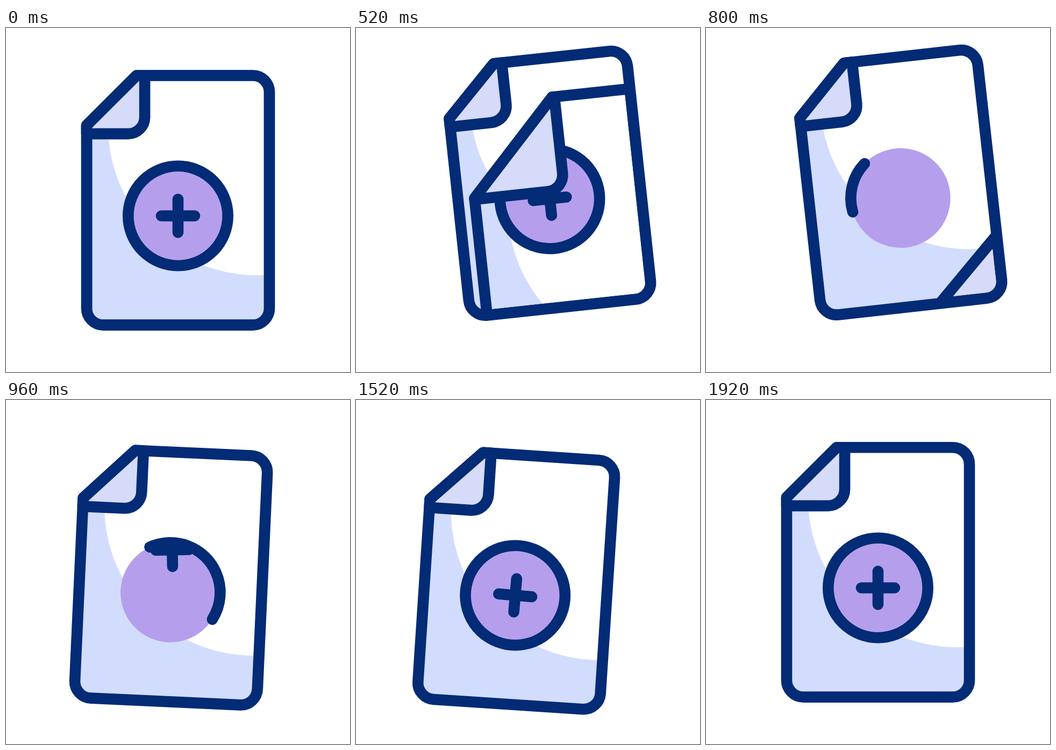
An HTML page with a canvas for the animation above (2000 ms loop, 640 by 640 pixels).

```html
<!DOCTYPE html>
<html lang="en">
<head>
<meta charset="utf-8">
<title>Add page</title>
<style>
  html, body { margin: 0; width: 100%; height: 100%; overflow: hidden; background: #fff; }
  canvas { display: block; width: 100vmin; height: 100vmin; }
</style>
</head>
<body>
<canvas id="stage" width="640" height="640"></canvas>
<script>
const ctx = document.getElementById('stage').getContext('2d');
const LOOP = 2000, STEP = 40;
const INK = '#032b76', SHADE = '#d2ddfe', FLAP = '#d5dbf8', DISC = '#b59fec';
const L = 150, R = 490.1, T = 88.3, B = 552.6, RAD = 31, WIDTH = 20.6;
const CX = 320, CY = 349.5, RING = 92.7;
const DEG = Math.PI / 180;

const clamp = (v, lo = 0, hi = 1) => Math.min(hi, Math.max(lo, v));
const mix = (a, b, p) => a + (b - a) * p;
const span = (t, a, b) => clamp((t - a) / (b - a));

// cubic-bezier(.47, 0, .22, 1)
function ease(x) {
  let lo = 0, hi = 1;
  for (let i = 0; i < 30; i++) {
    const u = (lo + hi) / 2, v = 1 - u;
    if (3 * u * v * v * 0.47 + 3 * u * u * v * 0.22 + u * u * u < x) lo = u; else hi = u;
  }
  return lo * lo * (3 - 2 * lo);
}

// Poses: turn in degrees, shift of the page centre; bulge bends the path
const REST = [0, 0, 0], LEAN = [-7, 45.8, -37], TILT = [7.93, -53, 25.7];
const SWINGS = [
  { from: 200, to: 720, a: REST, b: LEAN, bulge: [1, 1.5] },
  { from: 720, to: 1260, a: LEAN, b: TILT, bulge: [3.9, 5.7] },
  { from: 1260, to: 1920, a: TILT, b: REST, bulge: [1.3, 1.8] }
];

function pose(t) {
  const s = SWINGS.find(k => t < k.to) || SWINGS[2];
  const p = ease(span(t, s.from, s.to)), arc = 4 * p * (1 - p);
  return [
    mix(s.a[0], s.b[0], p),
    mix(s.a[1], s.b[1], p) + arc * s.bulge[0],
    mix(s.a[2], s.b[2], p) + arc * s.bulge[1]
  ];
}

// Fold position for peel amount w: top tip, left tip, flap corner
function fold(w) {
  const go = (a, b, k, max) => Math.min(max, a + (b - a) * (k * w + (1 - k) * w * w));
  return {
    tx: go(243, R, 1.62, R), ty: go(T, 438, 0.636, B),
    lx: go(L, 371, 0.29, R), ly: go(181, B, 1.62, B),
    cx: go(258.1, R, 1.52, R), cy: go(196.9, B, 1.52, B)
  };
}

function sheetPath(f, round) {
  const p = new Path2D();
  p.moveTo(f.tx, f.ty);
  if (round) {
    p.arcTo(R, f.ty, R, B, RAD);
    p.arcTo(R, B, f.lx, B, RAD);
    p.arcTo(f.lx, B, f.lx, f.ly, RAD);
  } else {
    p.lineTo(R, f.ty);
    p.lineTo(R, B);
    p.lineTo(f.lx, B);
  }
  p.lineTo(f.lx, f.ly);
  p.closePath();
  return p;
}

function drawFlap(f) {
  const p = new Path2D();
  p.moveTo(f.tx, f.ty);
  p.lineTo(f.cx, f.ty);
  p.arcTo(f.cx, f.cy, f.lx, f.cy, RAD);
  p.lineTo(f.lx, f.cy);
  p.lineTo(f.lx, f.ly);
  p.closePath();
  ctx.fillStyle = FLAP;
  ctx.fill(p);
  ctx.stroke(p);
}

function drawPaper(path, dx, dy) {
  const x = 467 + dx, y = 183 + dy, r = 277;
  ctx.fillStyle = SHADE;
  ctx.fill(path);
  ctx.save();
  ctx.clip(path);
  ctx.fillStyle = '#fff';
  ctx.beginPath();
  ctx.moveTo(x - r, -900);
  ctx.arc(x, y, r, Math.PI, Math.PI / 2, true);
  ctx.lineTo(1500, y + r);
  ctx.lineTo(1500, -900);
  ctx.fill();
  ctx.restore();
}

function disc() {
  ctx.beginPath();
  ctx.arc(CX, CY, RING, 0, 2 * Math.PI);
}

function drawPlus(dy, turn) {
  ctx.save();
  ctx.translate(CX, CY + dy);
  ctx.rotate(turn * DEG);
  ctx.beginPath();
  ctx.moveTo(-RAD, 0);
  ctx.lineTo(RAD, 0);
  ctx.moveTo(0, -RAD);
  ctx.lineTo(0, RAD);
  ctx.stroke();
  ctx.restore();
}

function drawBadge(start, length, dy, turn) {
  ctx.fillStyle = DISC;
  disc();
  ctx.fill();
  if (dy > -124) {
    ctx.save();
    disc();
    ctx.clip();
    drawPlus(dy, turn);
    ctx.restore();
  }
  if (length > 0) {
    ctx.beginPath();
    ctx.arc(CX, CY, RING, start * DEG, (start + Math.min(length, 360)) * DEG);
    ctx.stroke();
  }
}

function drawNewBadge(t) {
  const s = t - 800;
  const start = 170 + 0.437 * s + 0.00012 * s * s;
  const length = t < 660 ? 0 : t > 1250 ? 360 : 60 + 0.48 * s + 0.0004 * s * s;
  const dy = -124 * (1 - ease(span(t, 850, 1180)));
  const turn = 90 * (1 - ease(span(t, 850, 1630)));
  drawBadge(start, length, dy, turn);
}

function drawFront(w, page) {
  const f = fold(w), path = sheetPath(f, false);
  ctx.save();
  ctx.clip(page);
  drawPaper(path, 172 * w, 720 * w);
  ctx.save();
  ctx.clip(path);
  drawBadge(0, 360, 0, 0);
  ctx.restore();
  ctx.stroke(path);
  drawFlap(f);
  ctx.restore();
}

function draw(t) {
  const [turn, dx, dy] = pose(t);
  ctx.fillStyle = '#fff';
  ctx.fillRect(0, 0, 640, 640);
  ctx.save();
  ctx.translate(CX + dx, CY + dy);
  ctx.rotate(turn * DEG);
  ctx.translate(-CX, -CY);
  ctx.strokeStyle = INK;
  ctx.lineWidth = WIDTH;
  ctx.lineCap = ctx.lineJoin = 'round';

  const home = fold(0), page = sheetPath(home, true);
  drawPaper(page, 0, 0);
  drawNewBadge(t);
  drawFlap(home);
  if (t < 860) drawFront(Math.max(0, (t - 200) / 600) ** 2, page);
  ctx.stroke(page);
  ctx.restore();
}

function tick() {
  const t = performance.now() % LOOP;
  draw(Math.floor((t + 4) / STEP) * STEP % LOOP);
  requestAnimationFrame(tick);
}
tick();
</script>
</body>
</html>
```
